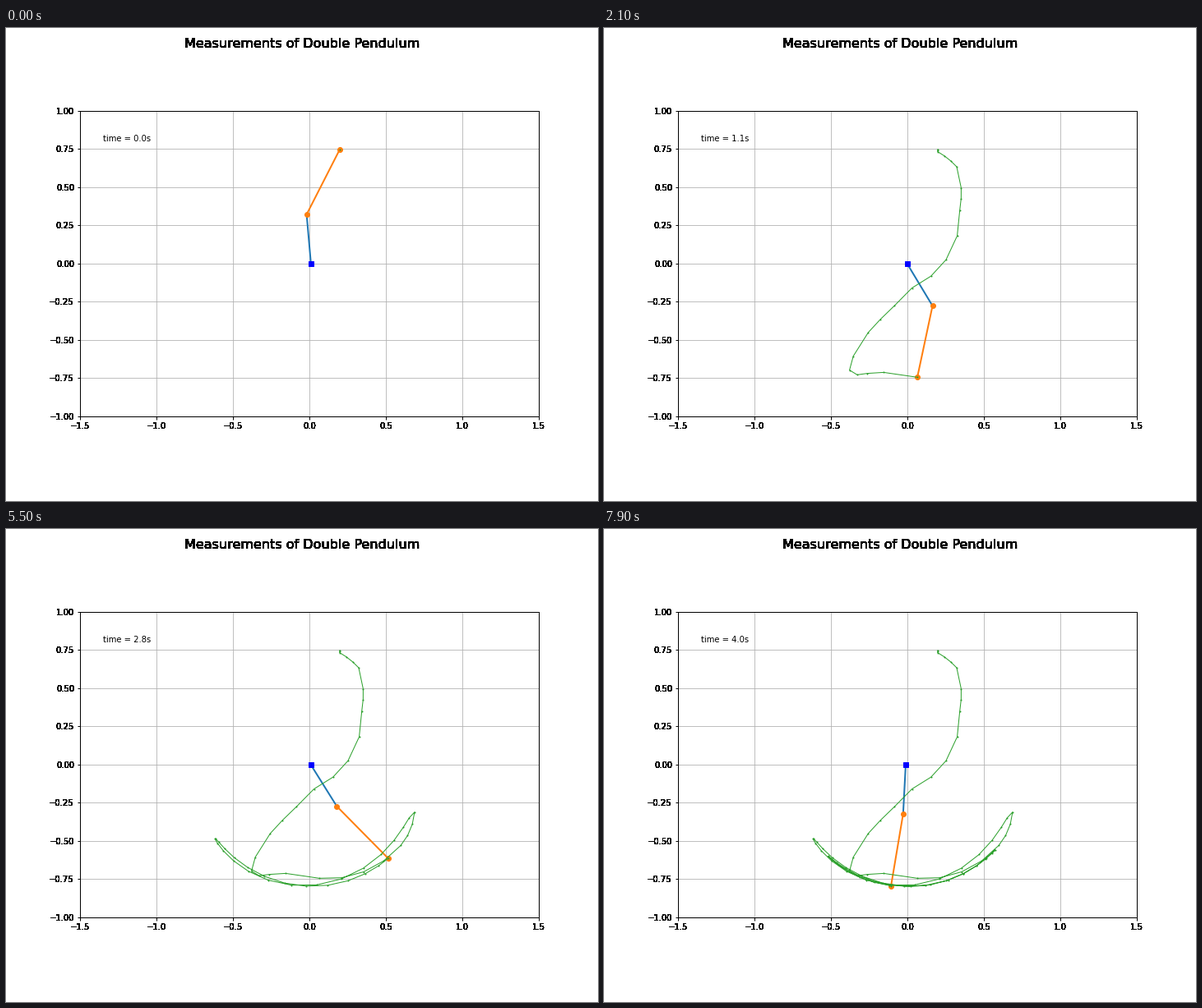
Animation, 720 px wide and 576 px high, one loop 8000 ms. Source, as a matplotlib script:

```python
import numpy as np
import matplotlib.pyplot as plt
from matplotlib.animation import FuncAnimation

FRAMES, INTERVAL, DT = 80, 100, 0.05
L1, L2 = 0.323, 0.478     # rod lengths

# Tumble from upright: step, upper angle, lower angle (degrees from straight down)
TUMBLE = np.array([
    (0, -175, 153), (2, -171, 150), (5, -172, 131), (6, -163, 113),
    (8, -155, 97), (10, -152, 57), (12, -149, 24), (13, -120, 24),
    (15, -94, 8), (17, -38, -22), (19, 1, -34), (20, 18, -32),
    (21, 31, -12), (25, 48, 49), (28, 43, 81),
])


def wave(t, peak, half_period):
    return np.cos(np.pi * (t - peak) / half_period)


def angles(t):
    """Both rod angles: a keyed tumble, then a decaying swing."""
    step, upper, lower = TUMBLE.T
    swing1 = (34 + 12 * np.exp((26 - t) / 6)) * wave(t, 26.4, 15.15)
    swing2 = 82 * (28 / np.maximum(t, 28)) ** 0.6 * wave(t, 28.4, 14.75)
    falling = t <= step[-1]
    a1 = np.where(falling, np.interp(t, step, upper), swing1)
    a2 = np.where(falling, np.interp(t, step, lower), swing2)
    return np.radians(a1), np.radians(a2)


def rod(length, angle):
    return length * np.column_stack([np.sin(angle), -np.cos(angle)])


def overdraw(artist, times=20):
    """Paint an artist repeatedly so its soft edges build up."""
    draw = artist.draw

    def repeat(renderer):
        for _ in range(times):
            draw(renderer)

    artist.draw = repeat


t = np.arange(FRAMES)
a1, a2 = angles(t)
drift = np.interp(t, [0, 15, 46, 64, 79], [0.01, 0, -0.011, 0.028, -0.011])
pivot = np.column_stack([drift, np.zeros(FRAMES)])
elbow = pivot + rod(L1, a1)
tip = elbow + rod(L2, a2)

plt.rcParams["font.family"] = "DejaVu Sans"
fig = plt.figure(figsize=(10, 8), dpi=72, facecolor="white")
title = fig.suptitle("Measurements of Double Pendulum", fontsize=16)

ax = fig.add_axes([0.125, 0.102, 0.775, 0.8], aspect="equal",
                  xlim=(-1.5, 1.5), ylim=(-1, 1))
ax.set_xticks(np.linspace(-1.5, 1.5, 7))
ax.set_yticks(np.linspace(-1, 1, 9))
ax.grid()
ax.tick_params(width=1)
for spine in ax.spines.values():
    spine.set_linewidth(1)
for text in [title, *ax.get_xticklabels(), *ax.get_yticklabels()]:
    overdraw(text)

upper, = ax.plot([], [], "-", color="C0", lw=2)
lower, = ax.plot([], [], "o-", color="C1", lw=2, ms=6)
trail, = ax.plot([], [], "o-", color="C2", lw=1, ms=1)
base, = ax.plot([], [], "s", color="blue", ms=6)
clock = ax.text(0.05, 0.9, "", transform=ax.transAxes)


def update(i):
    upper.set_data(*np.array([pivot[i], elbow[i]]).T)
    lower.set_data(*np.array([elbow[i], tip[i]]).T)
    trail.set_data(*tip[:i + 1].T)
    base.set_data(*pivot[i:i + 1].T)
    clock.set_text(f"time = {i * DT:.1f}s")
    return upper, lower, trail, base, clock


anim = FuncAnimation(fig, update, frames=FRAMES, interval=INTERVAL,
                     repeat=True, repeat_delay=0, blit=False)
plt.show()
```
